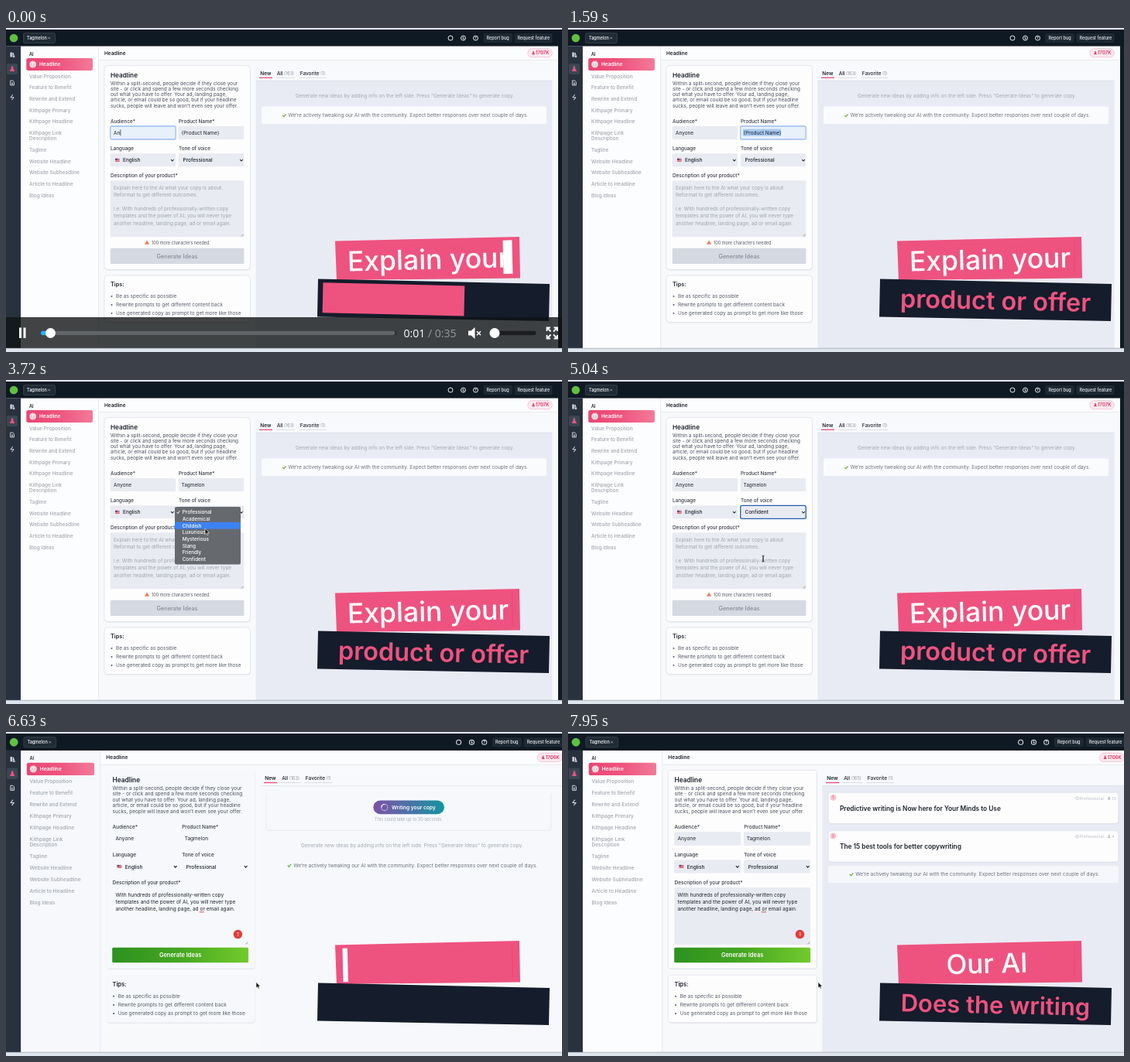
An HTML page that plays this animation: 718x419 px, repeating every 8 s.

```html
<!DOCTYPE html>
<html lang="en">
<head>
<meta charset="utf-8">
<title>Copy generator demo</title>
<style>
html,body{margin:0;width:100%;height:100%;overflow:hidden;background:#dfe5ec}
svg{display:block;width:718px;height:419px}
text{font-family:Inter,Roboto,sans-serif;white-space:pre}
.time{font-family:"Open Sans",sans-serif}
.card{fill:#fdfdfe;stroke:#dcdfe6;stroke-width:.7}
.field{fill:#e9ebf2}
.panel{fill:#e9ebf4}
.pale .card{fill:#f6f8fb;stroke:none}
.pale .field,.pale .panel,.pale .side{fill:#f6f8fb}
</style>
</head>
<body>
<svg id="stage" viewBox="0 0 718 419" xmlns="http://www.w3.org/2000/svg"></svg>
<script>
const LOOP = 8000, CUT = 6620, PASTE = 5570, RESULTS = 7650, ZOOM = 1.0185;
const INK = '#1d232c', MUTED = '#a1a6ae', PINK = '#ee537f';
const PRODUCT = 'Tagmelon';

// y is the vertical middle of the capitals
const text = (x, y, s, {size = 6.45, fill = INK, weight = 400, extra = ''} = {}) =>
  `<text x="${x}" y="${(y + size * .36).toFixed(2)}" font-size="${size}" fill="${fill}" font-weight="${weight}" ${extra}>${s}</text>`;
const rect = (x, y, w, h, fill, rx = 0, extra = '') =>
  `<rect x="${x}" y="${y}" width="${w}" height="${h}" ${fill ? `fill="${fill}"` : ''} rx="${rx}" ${extra}/>`;
const circle = (x, y, r, fill, extra = '') => `<circle cx="${x}" cy="${y}" r="${r}" fill="${fill}" ${extra}/>`;
const line = (d, stroke, w = .8, extra = '') =>
  `<path d="${d}" fill="none" stroke="${stroke}" stroke-width="${w}" ${extra}/>`;
const group = (id, body, extra = '') => `<g id="${id}" ${extra}>${body}</g>`;
const lines = (x, y, step, list, opt) => list.map((s, i) => text(x, y + i * step, s, opt)).join('');
const field = (x, y, w, h) => rect(x, y, w, h, '', 1.5, 'class="field"');
const card = (x, y, w, h) =>
  rect(x + .3, y + 1, w, h, '#cfd3dc', 4, 'opacity=".55"') + rect(x, y, w, h, '', 4, 'class="card"');
const chevron = (x, y) => line(`M${x - 1.8} ${y - 1}l1.8 2 1.8 -2`, INK, 1.1);
const flask = (x, y, k, fill) =>
  `<path transform="translate(${x} ${y}) scale(${k})" d="M-1.2 -3.5H1.2V-1L3.2 3H-3.2L-1.2 -1Z" fill="${fill}"/>`;
const gradient = (id, ...stops) => `<linearGradient id="${id}">` +
  stops.map((c, i) => `<stop offset="${i / (stops.length - 1)}" stop-color="${c}"/>`).join('') + '</linearGradient>';

function topBar() {
  const icons = [574, 590.5, 606.5].map(x => circle(x, 13, 3, 'none', 'stroke="#e4e8ec" stroke-width="1"')).join('');
  return rect(0, 2, 718, 21.5, '#0f1923') + circle(10, 13, 5.3, '#5fc143') +
    rect(22.5, 6.5, 41, 13, '#202b36', 2, 'stroke="#46515c" stroke-width=".6"') +
    text(27, 13, PRODUCT, {size: 5.5, fill: '#fff', weight: 500}) +
    line('M54.5 11.8l2.4 2.4m0 -2.4l-2.4 2.4', '#c5cbd1', .6) + icons +
    line('M591 10.8l-1.4 2.4h2l-1.2 2.2', '#fff', .7) +
    text(606.5, 13, '?', {size: 4.5, fill: '#fff', weight: 700, extra: 'text-anchor="middle"'}) +
    rect(616.5, 7, 37.5, 12, '#1d2833', 2) + rect(656.5, 7, 49, 12, '#1d2833', 2) +
    text(620.5, 13, 'Report bug', {size: 5.5, fill: '#eef1f4', weight: 500}) +
    text(660.5, 13, 'Request feature', {size: 5.5, fill: '#eef1f4', weight: 500});
}

function sidebar() {
  const items = [[62.5, 'Value Proposition'], [77, 'Feature to Benefit'], [91.5, 'Rewrite and Extend'],
    [106.3, 'Kithpage Primary'], [121, 'Kithpage Headline'], [135.7, 'Kithpage Link'], [143, 'Description'],
    [157.8, 'Tagline'], [172.3, 'Website Headline'], [187, 'Website Subheadline'],
    [201.6, 'Article to Headline'], [216.2, 'Blog Ideas']];
  return rect(0, 23.5, 19, 395, '#28323f') + rect(1, 46, 14, 14, '#3b4653', 2) +
    rect(5.5, 31.5, 2.2, 6, '#dfe3e8') + line('M9 32l2 5.5H9Z', '#dfe3e8', 1) + flask(8, 53, 1, '#f0527d') +
    line('M5.7 68h3l1.7 1.7V74H5.7ZM7 71h2M7 72.5h2', '#dfe3e8', .9) + line('M8.8 86l-2.8 3.8h4l-2.6 3.4', '#dfe3e8', 1) +
    rect(19, 23.5, 100, 395, '#fcfdfe', 0, 'class="side"') +
    text(30, 33.8, 'AI', {size: 5.5, weight: 600}) +
    rect(26.3, 39, 85.7, 16, 'url(#rose)', 2.5) + circle(34.7, 47, 4.6, '#f8b7c8') +
    circle(34.7, 47, 3.2, 'none', 'stroke="#fff" stroke-width=".9"') + line('M34.7 49v-4m-1.5 1.5l1.5 -1.5 1.5 1.5', '#fff', .8) +
    text(43, 47, 'Headline', {fill: '#fff', weight: 600}) +
    items.map(([y, s]) => text(30, y, s, {fill: MUTED, weight: 500})).join('');
}

function form() {
  const intro = ['Within a split-second, people decide if they close your', 'site - or click and spend a few more seconds checking',
    'out what you have to offer. Your ad, landing page,', 'article, or email could be so good, but if your headline',
    'sucks, people will leave and won’t even see your offer.'];
  const hint = ['Explain here to the AI what your copy is about.', 'Reformat to get different outcomes.', '',
    'i.e. With hundreds of professionally-written copy', 'templates and the power of AI, you will never type',
    'another headline, landing page, ad or email again.'];
  const copy = ['With hundreds of professionally-written copy', 'templates and the power of AI, you will never type',
    'another headline, landing page, ad or email again.'];
  const tips = ['Be as specific as possible', 'Rewrite prompts to get different content back',
    'Use generated copy as prompt to get more like those'];
  const label = (x, y, s) => text(x, y, s, {fill: '#343a44', weight: 500, size: 6.35});
  const centred = 'text-anchor="middle"';
  return `<g id="formCard">${card(127, 48.5, 188.5, 264)}</g><g id="formCardShort">${card(127, 48.5, 188.5, 252)}</g>` +
    text(135, 61.3, 'Headline', {size: 8.2, weight: 600}) + lines(135, 71.4, 7.25, intro, {fill: '#4a505a', size: 6.4}) +
    label(135, 120.3, 'Audience*') + label(223, 120.3, 'Product Name*') +
    label(135, 156, 'Language') + label(223, 156, 'Tone of voice') + label(135, 191.2, 'Description of your product*') +
    field(134.7, 127, 84.5, 17) + field(222.7, 127, 84.5, 17) + field(134.7, 162.3, 84.5, 17) +
    field(222.7, 162.3, 84.5, 17) + field(134.7, 197.3, 172.7, 73) +
    rect(0, 0, 0, 0, 'none', 2, 'id="focus" stroke-width="1.3"') +
    rect(226, 130.6, 49, 9, '#a6c9f0', 0, 'id="picked"') +
    text(139, 135.5, '', {extra: 'id="audience"'}) + text(226.5, 135.5, '', {extra: 'id="product"'}) +
    rect(141, 168.8, 5.6, 4, '#d64055') + rect(141, 168.8, 2.6, 2.2, '#39538f') + line('M143.6 170h3M141 171.6h5.6', '#fff', .5) +
    text(151, 171, 'English', {weight: 500}) + chevron(214.8, 171) +
    text(228.5, 171, '', {weight: 500, extra: 'id="tone"'}) + chevron(304, 171) +
    line('M303.5 269.5l3 -3m-1.2 3l1.2 -1.2', '#777', .6) +
    group('hint', lines(139, 206.5, 9.15, hint, {fill: '#9da3ad'}) +
      `<path d="M182 274.6l3 5.2h-6Z" fill="#ee7a52"/>` + text(188, 277.6, '100 more characters needed.', {size: 5.5, fill: '#565c66'}) +
      rect(134.7, 284.7, 172.7, 20.3, '#d5d9e2', 1.5) +
      text(221, 295, 'Generate Ideas', {size: 7.3, fill: '#848b97', weight: 500, extra: centred})) +
    group('copy', lines(139, 206.5, 9.15, copy) + rect(134.7, 273.8, 172.7, 19, 'url(#leaf)', 1.5) +
      text(221, 283.3, 'Generate Ideas', {size: 7.3, fill: '#fff', weight: 600, extra: centred})) +
    group('helper', circle(294, 257, 5.5, '#13a68c') + line('M291.6 257a2.4 2.4 0 0 0 4.8 0', '#fff', 1.1)) +
    group('alert', circle(294, 256.8, 5.7, '#e0403c') + text(294, 256.8, '1', {size: 6, fill: '#fff', extra: centred}) +
      line('M245.2 228.6h6.2', '#e0403c', .9)) +
    rect(0, 0, .7, 8, INK, 0, 'id="caret"') +
    group('tips', card(127, 320, 188.5, 60.5) + text(135, 331.5, 'Tips:', {size: 7.3, weight: 600}) +
      tips.map((s, i) => circle(136.5, 347 + i * 11, 1, '#555c66') + text(142, 347 + i * 11, s, {fill: '#555c66'})).join(''));
}

function results() {
  const tick = y => line(`M357.2 ${y}l1.6 1.7 2.8 -3.4`, '#63b53b', 1.2);
  const notice = y => text(364.5, y, 'We’re actively tweaking our AI with the community. Expect better responses over next couple of days.',
    {size: 6.45, fill: '#6c727c'}) + tick(y);
  const prompt = y => text(374, y, 'Generate new ideas by adding info on the left side. Press "Generate Ideas" to generate copy.',
    {size: 6.45, fill: '#a2a7b1'});
  const idea = (y, n, s, score) => card(330, y, 368, 39.5) + circle(336.3, y + 6.5, 3.8, '#f9c3d1') +
    text(336.3, y + 6.5, n, {size: 4.5, fill: '#d9486f', extra: 'text-anchor="middle"'}) + text(344.6, y + 20.2, s, {size: 8.15, weight: 600}) +
    circle(645.5, y + 7.3, 1.8, 'none', 'stroke="#b9bdc5" stroke-width=".8"') +
    text(648.5, y + 7.3, 'Professional', {size: 5.3, fill: '#b9bdc5'}) + flask(686, y + 7.3, .6, '#b9bdc5') +
    text(689.5, y + 7.3, score, {size: 5.3, fill: '#b9bdc5'});
  return rect(322.5, 48, 383, 371, '', 0, 'class="panel"') + rect(322.5, 48, 383, 20, '#f8f9fc') +
    line('M322.5 68.3h383', '#d9dce4', .7) +
    text(328.3, 58.8, 'New', {weight: 600}) + text(349.7, 58.8, 'All', {weight: 500}) +
    text(359, 58.8, '', {size: 5.5, fill: '#8d939d', extra: 'id="count"'}) +
    text(379.8, 58.8, 'Favorite', {weight: 500}) + text(406, 58.8, '(1)', {size: 5.5, fill: '#8d939d'}) +
    line('M327 64.3h17', PINK, 1.4) + line('M348.5 64.3h25M378.5 64.3h35', '#d3d6dd', .8) +
    group('idle', rect(330, 101.6, 368, 22.5, '#fafbfd', 2) + prompt(87.3) + notice(113)) +
    group('busy', line('M330 78v43q0 4 4 4h353q4 0 4 -4V78', '#dfe2e9', .7) + rect(465.7, 87, 90, 17.2, 'url(#dusk)', 8.6) +
      circle(480, 95.8, 4, 'none', 'stroke="#b9a5d6" stroke-width="1.1"') +
      line('M480 91.8a4 4 0 0 1 4 4', '#fff', 1.2, 'id="spinner"') +
      text(489, 95.8, 'Writing your copy', {size: 6.5, fill: '#fff', weight: 600}) +
      text(510.5, 111, 'This could take up to 30 seconds.', {size: 5.4, fill: '#a9aeb8', extra: 'text-anchor="middle"'}) +
      prompt(143.5) + notice(169.4)) +
    group('done', idea(76.8, 1, 'Predictive writing is Now here for Your Minds to Use', '10') +
      idea(125.5, 2, 'The 15 best tools for better copywriting', '4') + rect(330, 170, 368, 21.5, '#f6f7fb', 2) + notice(180.7));
}

const tones = ['Professional', 'Academical', 'Childish', 'Luxurious', 'Mysterious', 'Slang', 'Friendly', 'Confident'];
const menu = () => rect(218, 164, 85, 74.5, '#666a6f', 2) + rect(218, 0, 85, 8.8, '#3d82f3', 0, 'id="hover"') +
  lines(227.7, 170.9, 8.68, tones, {size: 6.4, fill: '#fff', weight: 500}) + line('M220.6 171l1.4 1.6 2.4 -3.4', '#fff', 1);

const overlay = () => `<polygon points="425,275.5 663,270 664,323.5 427,326" fill="${PINK}"/>
  <polygon points="403,324.5 702,331 701,379 402,373.5" fill="#151c2b"/>` +
  [['top', -1.4, 545, 300, 277, 43.5, '#fff', 500], ['low', 1.3, 552, 352.2, 332.5, 39, PINK, 600]].map(([id, turn, x, y, by, bh, fill, weight]) =>
    `<g transform="rotate(${turn} ${x} ${y})">` + (id === 'top' ? line('M654 277v43.5', '#d8476f', .6) : '') +
    `<clipPath id="${id}Clip">${rect(0, 260, 0, 130, '', 0, `id="${id}Mask"`)}</clipPath>` +
    `<g clip-path="url(#${id}Clip)">` + text(x, y, '', {size: 33, fill, weight, extra: `id="${id}Text" text-anchor="middle"`}) + '</g>' +
    rect(0, by, 0, bh, fill, 0, `id="${id}Block"`) + '</g>').join('');

const player = () => rect(0, 374, 718, 40.5, '#101214', 0, 'opacity=".79"') + rect(17, 387.5, 3, 13.5, '#fff') + rect(22.5, 387.5, 3, 13.5, '#fff') +
  rect(45, 391.8, 459, 5.4, '#1c1e20', 2.7) + rect(45, 391.8, 457.5, 5.4, '#626568', 2.7) +
  rect(45, 391.8, 12, 5.4, '#27b4ef', 2.7) + circle(57.5, 394.5, 6.5, '#fff') +
  `<text class="time" x="513.5" y="399.8" font-size="14" fill="#fff">0:01<tspan fill="#96999b"> / 0:35</tspan></text>` +
  '<path d="M597 391.5h3.5l5 -4.5v15l-5 -4.5h-3.5Z" fill="#fff"/>' + line('M608 392.2l5 5m0 -5l-5 5', '#fff', 1.5) +
  rect(625, 391.8, 59.5, 5.4, '#1c1e20', 2.7) + circle(631, 394.5, 6.5, '#fff') +
  line('M703 387.5h-4.5V392M707.5 387.5h4.5V392M703 401.5h-4.5V397M707.5 401.5h4.5V397M699 388l4.5 4.5M711.5 388l-4.5 4.5M699 401l4.5 -4.5M711.5 401l-4.5 -4.5', '#fff', 1.8);

const stage = document.getElementById('stage');
stage.innerHTML = '<defs>' + gradient('rose', '#ea4672', '#ee557f', '#f27a99') + gradient('leaf', '#2c921f', '#46a622', '#72cb2c') +
  gradient('dusk', '#7c52a5', '#4d72a8', '#13959f') + '<clipPath id="view"><rect y="2" width="718" height="412"/></clipPath></defs>' +
  rect(0, 0, 718, 419, '#dfe5ec') + '<g clip-path="url(#view)">' +
  group('page', rect(0, 2, 720, 417, '#f7f9fb') + sidebar() + rect(119.5, 23.5, 594, 18, '#fcfdfe') +
    line('M119.5 41.5h594M119.5 23.5v392', '#e1e4ea', .7) + text(127, 32.3, 'Headline', {weight: 600}) +
    rect(673.8, 26.8, 31.5, 11, '#fdeaf0', 5.5, 'stroke="#f3b3c6" stroke-width=".7"') + flask(681, 32.3, .65, '#e0436e') +
    text(684, 32.3, '', {size: 6, fill: '#d8325f', weight: 600, extra: 'id="tokens"'}) +
    results() + form() + group('menu', menu()) + rect(713, 2, 5, 417, '#111b26') + topBar()) +
  group('overlay', overlay()) + group('arrow', '<path d="M0 0V7.6L1.8 6 3 8.7 4.3 8.1 3.1 5.5H5.5Z" fill="#111" stroke="#fff" stroke-width=".6"/>') +
  group('beam', line('M-1.5 -4q1.5 0 1.5 1V3q0 1 -1.5 1M1.5 -4q-1.5 0 -1.5 1V3q0 1 1.5 1', '#222', .8)) +
  group('player', player()) + '</g>' + line('M0 414.3h718', '#9aa7b5', .7);

const $ = {};
stage.querySelectorAll('[id]').forEach(el => $[el.id] = el);
const set = (el, attrs) => Object.entries(attrs).forEach(([k, v]) => el.setAttribute(k, v));
const show = (el, on) => set(el, {display: on ? 'inline' : 'none'});
const clamp = (v, a = 0, b = 1) => Math.min(b, Math.max(a, v));
const ease = v => (v = clamp(v)) < .5 ? 4 * v ** 3 : 1 - (2 - 2 * v) ** 3 / 2;

const captions = {
  pitch: {top: ['Explain your', 545, 35.5], low: ['product or offer', 552, 32.4]},
  claim: {top: ['Our AI', 541, 35], low: ['Does the writing', 552, 31]}
};

// A block grows from the left, then collapses to the right, showing or hiding the text behind it.
function wipe(id, [words, x, size], p, delay, hold, x0, x1, leaving) {
  const right = x0 + (x1 - x0) * ease((p - delay) / 310);
  const left = x0 + (x1 - x0) * ease((p - delay - hold) / 310);
  $[id + 'Text'].textContent = words;
  set($[id + 'Text'], {x, 'font-size': size});
  set($[id + 'Block'], {x: left, width: Math.max(0, right - left)});
  const start = leaving ? (right > x0 ? right : 380) : 380;
  const end = leaving ? (right < x1 ? 718 : start) : left >= x1 ? 718 : left > x0 ? left : 380;
  set($[id + 'Mask'], {x: start, width: Math.max(0, end - start)});
}

const path = [[2850, 266, 140], [3350, 262, 171], [3720, 257, 192], [4280, 252, 231], [5520, 252, 231], [5800, 211, 213], [CUT, 211, 213]];
function pointer(t) {
  if (t >= CUT) return [323, 323.5];
  const i = clamp(path.findIndex(k => k[0] > t), 1, path.length - 1);
  const [a, b] = [path[i - 1], path[i]], k = clamp((t - a[0]) / (b[0] - a[0]));
  return [a[1] + (b[1] - a[1]) * k, a[2] + (b[2] - a[2]) * k];
}

function draw(t) {
  const late = t >= CUT, pasted = t >= PASTE, done = t >= RESULTS;
  set($.page, {transform: `scale(${late ? ZOOM : 1})`, class: late && t < 6755 ? 'pale' : ''});
  $.tokens.textContent = late ? '1706K' : '1707K';
  $.count.textContent = done ? '(165)' : '(163)';

  $.audience.textContent = 'Anyone'.slice(0, 2 + Math.floor(t / 150));
  const typed = Math.floor((t - 1800) / 115);
  $.product.textContent = typed > 0 ? PRODUCT.slice(0, typed) : '{Product Name}';
  show($.picked, t >= 1250 && typed <= 0);
  $.tone.textContent = t >= 4420 && !late ? 'Confident' : 'Professional';

  const choosing = t >= 4420 && t < 5450;
  const focus = t < 1250 ? [134.7, 127, 84.5, 17] : t < 2900 ? [222.7, 127, 84.5, 17] :
    choosing ? [222.7, 162.3, 84.5, 17] : t >= 5450 && !late ? [134.7, 197.3, 172.7, 73] : null;
  show($.focus, focus);
  if (focus) set($.focus, {x: focus[0], y: focus[1], width: focus[2], height: focus[3],
    stroke: choosing ? '#285fb0' : '#9dbfee', fill: t < 2900 ? '#e8f0fa' : 'none'});

  const box = t < 1250 ? $.audience : typed > 0 && t < 2900 ? $.product : null;
  show($.caret, box || (pasted && !late));
  if (box) set($.caret, {x: +box.getAttribute('x') + box.getComputedTextLength() + .3, y: 131.3});
  else set($.caret, {x: 290, y: 220.5});

  show($.hint, !pasted);
  show($.copy, pasted);
  show($.formCard, !pasted);
  show($.formCardShort, pasted);
  show($.helper, pasted && !late);
  show($.alert, late);
  set($.tips, {transform: `translate(0 ${pasted ? -11.5 : 0})`});
  show($.idle, !late);
  show($.busy, late && !done);
  show($.done, done);
  set($.spinner, {transform: `rotate(${(t - CUT) * .36 - 90} 480 95.8)`});

  const [x, y] = pointer(t), open = t >= 3350 && t < 4420;
  show($.menu, open);
  set($.hover, {y: 166.5 + 8.68 * clamp(Math.round((y + 1 - 175) / 8.68), 0, 7)});
  const beam = t >= 4420 && !late;
  show($.beam, beam);
  show($.arrow, !beam && t >= 2850);
  set($.beam, {transform: `translate(${x} ${y})`});
  set($.arrow, {transform: `translate(${x} ${y})`});

  const next = t >= 6571, leaving = t >= 5500 && !next;
  const p = next ? t - 6571 : leaving ? t - 5524 : t + 560;
  const caption = next ? captions.claim : captions.pitch;
  wipe('top', caption.top, p, 0, 325, 435, 654, leaving);
  wipe('low', caption.low, p, 390, 310, 409, 695, leaving);

  set($.player, {opacity: 1 - clamp((t - 600) / 350)});
  show($.player, t < 950);
}

function tick(now) {
  draw(now % LOOP);
  requestAnimationFrame(tick);
}
draw(0);
requestAnimationFrame(tick);
</script>
</body>
</html>
```
